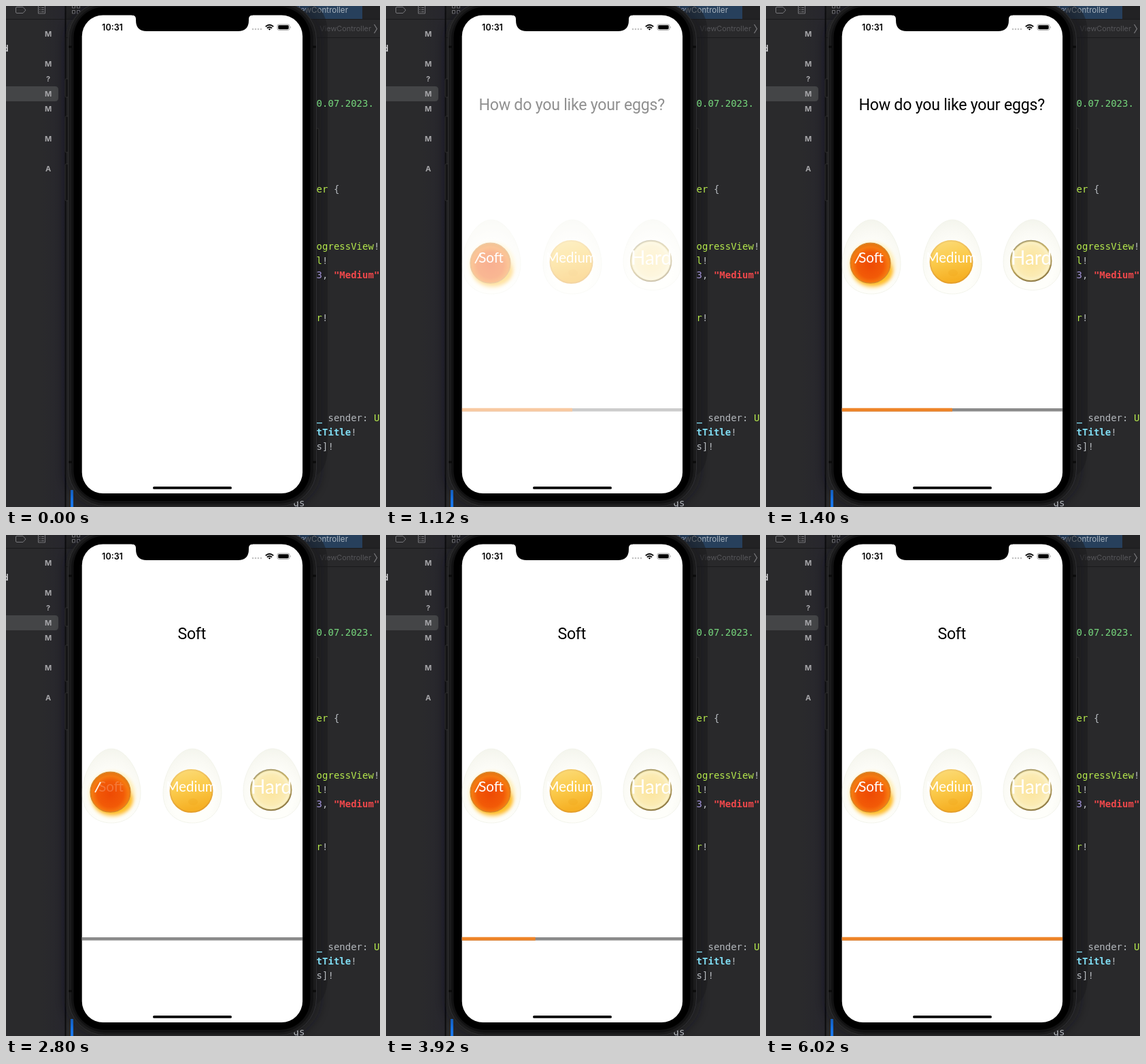
Animation of 550x736 px, one loop 8000 ms. Source, as an HTML page:

```html
<!DOCTYPE html>
<html lang="en">
<head>
<meta charset="utf-8">
<title>Egg timer</title>
<style>
html, body { margin: 0; width: 100%; height: 100%; overflow: hidden; background: #29292b; }
svg { display: block; width: 100%; height: 100%; }
text { white-space: pre; }
.ui { font-family: Inter, sans-serif; }
.code { font: 14px "DejaVu Sans Mono", monospace; fill: #b4b8bd; }
.status { font: 700 11px Inter, sans-serif; fill: #a6a6a9; text-anchor: middle; }
.label { font: 400 20.5px Lato, sans-serif; fill: #fff; }
.title { font: 400 23.2px Roboto, sans-serif; letter-spacing: -.25px; text-anchor: middle; }
.lime { fill: #b5e84c; } .green { fill: #76d67c; } .red { fill: #f2484b; }
.cyan { fill: #7fdcf2; } .violet { fill: #a596dc; }
.red, .cyan { font-weight: 700; }
</style>
</head>
<body>
<svg viewBox="0 0 550 736" preserveAspectRatio="none">
<defs>
  <linearGradient id="side"><stop offset=".6" stop-color="#2a2a2c"/><stop offset="1" stop-color="#27262d"/></linearGradient>
  <radialGradient id="white" cx=".5" cy=".68" r=".68">
    <stop offset=".5" stop-color="#fefefa"/><stop offset=".8" stop-color="#f9f9f3"/><stop offset="1" stop-color="#f4f5ed"/>
  </radialGradient>
  <radialGradient id="soft" cy=".55">
    <stop offset="0" stop-color="#ee4a04"/><stop offset=".65" stop-color="#f25a07"/><stop offset=".9" stop-color="#f67a10"/><stop offset="1" stop-color="#e87812"/>
  </radialGradient>
  <linearGradient id="medium" x2=".25" y2="1">
    <stop offset="0" stop-color="#fbdc7c"/><stop offset=".5" stop-color="#fbcb4c"/><stop offset="1" stop-color="#f6b024"/>
  </linearGradient>
  <linearGradient id="rim" x2=".25" y2="1">
    <stop offset="0" stop-color="#f3cf72"/><stop offset="1" stop-color="#e59f2a"/>
  </linearGradient>
  <radialGradient id="hard">
    <stop offset="0" stop-color="#fce49a"/><stop offset=".75" stop-color="#fbebb4"/><stop offset=".9" stop-color="#fbf1c6"/><stop offset="1" stop-color="#e3cf88"/>
  </radialGradient>
  <linearGradient id="ring" x2=".4" y2="1">
    <stop offset="0" stop-color="#a09a7c"/><stop offset=".5" stop-color="#c9b264"/><stop offset="1" stop-color="#917d48"/>
  </linearGradient>
  <path id="egg" d="M0-57C22-57 43-22 43 8C43 36 24 52 0 52C-24 52-43 36-43 8C-43-22-22-57 0-57Z" fill="url(#white)" stroke="#f0f1e8" stroke-width=".8"/>
  <clipPath id="screen"><rect x="111.700" y="13.400" width="324.400" height="702.600" rx="31"/></clipPath>
  <filter id="blur" x="-20%" y="-10%" width="140%" height="120%"><feGaussianBlur stdDeviation="7"/></filter>
  <filter id="melt" x="-30%" y="-30%" width="160%" height="160%"><feGaussianBlur stdDeviation="2.500"/></filter>
</defs>

<!-- editor window -->
<rect width="550" height="736" fill="#29292b"/>
<rect width="87" height="736" fill="url(#side)"/>
<rect x="88" width="462" height="19" fill="#222224"/>
<rect x="420" width="104" height="19" fill="#27405c"/>
<path d="M0 19.5H550M88 46.5H550" stroke="#1a1a1c"/>
<path d="M87.5 0V736" stroke="#0c0c0e" stroke-width="2"/>
<path d="M0 118H72Q77 118 77 123V135Q77 140 72 140H0Z" fill="#444547"/>
<g fill="none" stroke="#77777b">
  <path d="M16 1.5H25L29 6L25 10.5H16Q14.5 10.5 14.5 9V3Q14.5 1.5 16 1.5Z"/>
  <path d="M47.5-2H57.5V11H47.5ZM49 2.5H50.5M52 2.5H56M49 5.5H50.5M52 5.5H56M49 8.5H50.5M52 8.5H56"/>
  <path d="M97.5-1H101.5V3H97.5ZM104.5-1H108.5V3H104.5ZM97.5 6.5H101.5V11H97.5ZM104.5 6.5H108.5V11H104.5Z"/>
</g>
<g id="marks"></g>
<text class="ui" x="-4.300" y="67" font-size="12.500" font-weight="500" fill="#f2f2f4">d</text>
<text class="ui" x="503" y="9.600" font-size="11.600" text-anchor="end" fill="#a9b3be">ViewController</text>
<text class="ui" x="537" y="37" font-size="10.900" text-anchor="end" fill="#56565a">ViewController</text>
<path d="M541.5 27L545.5 33.5L541.5 40" fill="none" stroke="#7b7b7f" stroke-width="1.2"/>
<rect x="95" y="711" width="4" height="25" fill="#1878ee"/>

<!-- phone -->
<rect x="86" y="-4" width="377" height="742" rx="58" fill="#101012" opacity=".45" filter="url(#blur)"/>
<rect x="430" y="0" width="43" height="690" rx="40" fill="#1b1b1c" opacity=".5"/>
<g id="code"></g>
<g fill="#141415" stroke="#353537" stroke-width=".8">
  <rect x="87" y="107" width="6" height="27" rx="1.5"/>
  <rect x="87" y="162" width="6" height="53" rx="1.5"/>
  <rect x="87" y="232" width="6" height="54" rx="1.5"/>
  <rect x="454" y="180" width="6" height="86" rx="1.5"/>
</g>
<rect x="91.5" y="-6" width="365" height="741" rx="55" fill="#1b1b1c" stroke="#303032"/>
<rect x="96" y="-2" width="356" height="733" rx="51" fill="#111112"/>
<path d="M92 60H97M451 60H456M92 670H97M451 670H456" stroke="#0a0a0a" stroke-width="3"/>
<rect x="99.5" y="1.5" width="348" height="725.5" rx="45"/>
<rect x="111.700" y="13.400" width="324.400" height="702.600" rx="31" fill="#fff"/>
<path d="M185 12V13.400Q191 13.400 191 19V21Q191 37 207 37H341Q357 37 357 21V19Q357 13.400 363 13.400V12Z"/>

<text class="ui" x="156.500" y="35.500" font-size="12.500" font-weight="600" text-anchor="middle">10:31</text>
<path d="M363 34H377" stroke="#c3c3c3" stroke-width="2.600" stroke-linecap="round" stroke-dasharray="0 4"/>
<g fill="none" stroke="#000" stroke-width="1.900">
  <path d="M381.8 30.300Q387.500 25.300 393.200 30.300M383.900 32.600Q387.500 29.500 391.100 32.600"/>
  <path d="M385.700 33.800Q387.500 32.400 389.300 33.800L387.500 35.700Z" fill="#000" stroke="none"/>
</g>
<rect x="399" y="27" width="18" height="8.500" rx="2.500" fill="none" stroke="#8e8e8e" stroke-width=".8"/>
<rect x="400.300" y="28.300" width="15.400" height="5.900" rx="1.400"/>
<path d="M418.300 29.800Q420 31.200 418.300 32.800Z" fill="#8e8e8e"/>
<rect x="216" y="706" width="116" height="3.800" rx="1.900"/>

<!-- app content -->
<g clip-path="url(#screen)"><g id="app">
  <text class="title" id="title" x="273.200" y="153.300"></text>

  <use href="#egg" x="155" y="371"/>
  <g filter="url(#melt)">
    <ellipse cx="156" cy="381" rx="34" ry="34" fill="#ffe9a0" opacity=".7"/>
    <ellipse cx="157" cy="389" rx="30" ry="23" fill="#ffbf2c"/>
  </g>
  <circle cx="153.500" cy="377.700" r="29.500" fill="url(#soft)" stroke="#d5862a" stroke-width="1.300"/>
  <path d="M131 378L139 363" stroke="#fff2e2" stroke-width="1.800"/>

  <use href="#egg" x="274" y="371"/>
  <circle cx="272.500" cy="376" r="31" fill="url(#medium)" stroke="url(#rim)" stroke-width="2"/>
  <ellipse cx="275" cy="392" rx="7" ry="5" fill="#eda51c" opacity=".3"/>

  <use href="#egg" transform="translate(392 368) scale(1 .95)"/>
  <circle cx="389.700" cy="374.500" r="29.800" fill="url(#hard)" stroke="url(#ring)" stroke-width="2"/>

  <text class="label" id="tap" x="136.300" y="377">Soft</text>
  <text class="label" x="235.500" y="377">Medium</text>
  <text class="label" x="360" y="379.500" style="font-size:28px">Hard</text>

  <rect x="111" y="591" width="326" height="4.600" fill="#8b8b8b"/>
  <rect id="bar" x="111" y="590.700" height="5" fill="#ee8428"/>
</g></g>
</svg>
<script>
const $ = id => document.getElementById(id);
const LOOP = 8000, TICK = 70, SHOW = 1120, TAP = 2800, FIRST = 3920, SECOND = 1050;

// version control letters in the sidebar
$("marks").innerHTML = [["M", 45], ["M", 89], ["?", 111], ["M", 133], ["M", 155], ["M", 199], ["A", 243]]
  .map(([s, y]) => `<text class="status" x="62" y="${y}">${s}</text>`).join("");

// visible ends of code lines: baseline, then [class, text] runs
const lines = [
  [148, ["green", "0.07.2023."]],
  [274, ["lime", "er"], ["", " {"]],
  [358, ["lime", "ogressView"], ["", "!"]],
  [379, ["lime", "l"], ["", "!"]],
  [400, ["violet", "3"], ["", ", "], ["red", '"Medium"']],
  [463, ["lime", "r"], ["", "!"]],
  [610, ["cyan", "_"], ["", " sender: "], ["lime", "U"]],
  [631, ["cyan", "tTitle"], ["", "!"]],
  [652, ["", "s]!"]]
];
const run = ([c, s]) => `<tspan class="${c}">${s}</tspan>`;
$("code").innerHTML = lines
  .map(([y, ...runs]) => `<text class="code" x="456.6" y="${y}">${runs.map(run).join("")}</text>`)
  .join("") + '<text class="code" x="422.6" y="735">gs</text>';

const clamp = v => Math.max(0, Math.min(1, v));

function draw(t) {
  const fade = Math.floor((t - SHOW) / TICK);
  const lift = Math.floor((t - TAP) / TICK);
  const tapped = t >= TAP;
  const left = 1 - clamp(.25 + .15 * fade);
  $("app").setAttribute("opacity", fade < 0 ? 0 : fade > 3 ? 1 : 1 - left * left);
  $("title").textContent = tapped ? "Soft" : "How do you like your eggs?";
  $("tap").setAttribute("opacity", tapped ? clamp(.2 + .8 * lift / 7) : 1);
  const count = Math.floor((t - FIRST) / SECOND) + 1;
  $("bar").setAttribute("width", 326 * (tapped ? clamp(count / 3) : .5));
}

const start = performance.now();
function frame(now) {
  draw(Math.max(0, now - start) % LOOP);
  requestAnimationFrame(frame);
}
draw(0);
requestAnimationFrame(frame);
</script>
</body>
</html>
```
